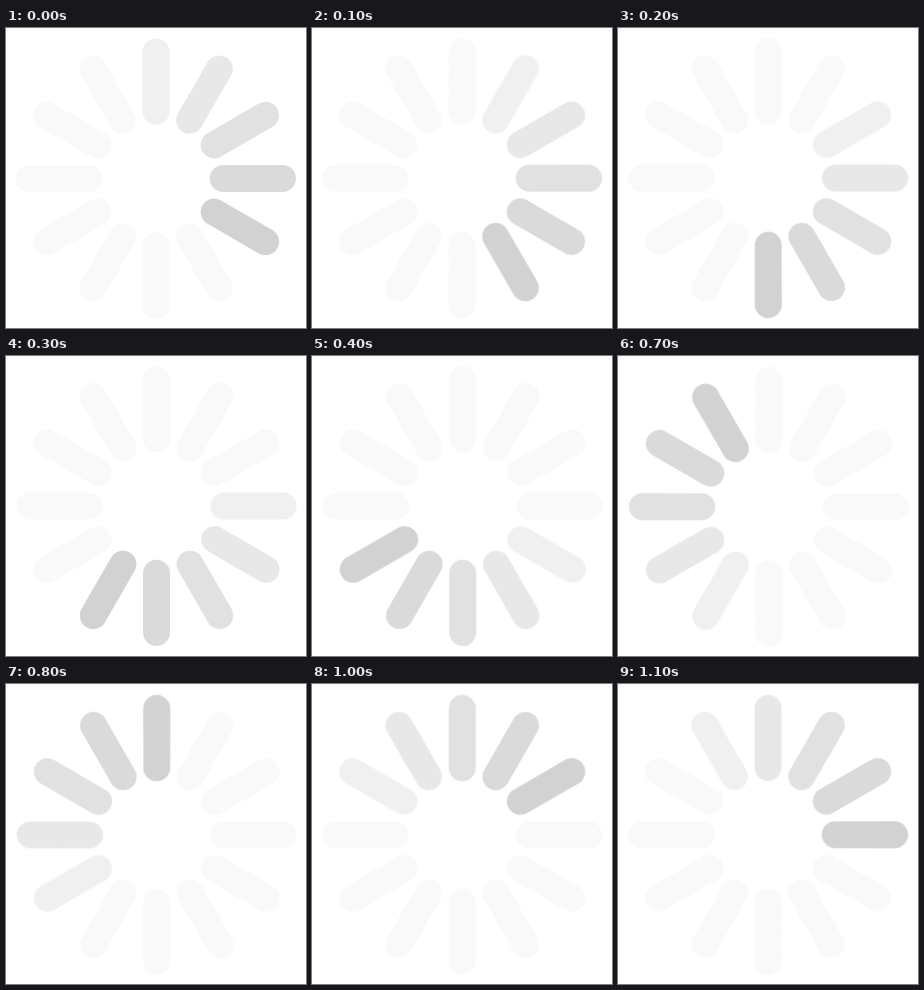
These frames come from a looping animation (300x300 px, 1200 ms). An HTML page:

```html
<!DOCTYPE html>
<html lang="en">
<head>
<meta charset="utf-8">
<title>Loading spinner</title>
<style>
  html, body { margin: 0; width: 100%; height: 100%; overflow: hidden; background: #fff; }
  svg { display: block; width: 100vw; height: 100vh; }
  /* The pivot sits half a pixel off the wheel's centre, giving a slight wobble. */
  .wheel {
    stroke: #f9f9f9;
    stroke-width: 27;
    stroke-linecap: round;
    transform-origin: 150.5px 150.5px;
    animation: spin 1200ms steps(12, end) infinite;
  }
  @keyframes spin {
    from { transform: rotate(0deg); }
    to { transform: rotate(360deg); }
  }
</style>
</head>
<body>
<svg viewBox="0 0 300 300">
  <defs>
    <line id="bar" y1="-126.5" y2="-67.2"/>
  </defs>
  <g class="wheel">
    <g transform="translate(150 150.5)">
      <use href="#bar" stroke="#f0f0f0"/>
      <use href="#bar" stroke="#e8e8e8" transform="rotate(30)"/>
      <use href="#bar" stroke="#e1e1e1" transform="rotate(60)"/>
      <use href="#bar" stroke="#dadada" transform="rotate(90)"/>
      <use href="#bar" stroke="#d2d2d2" transform="rotate(120)"/>
      <use href="#bar" transform="rotate(150)"/>
      <use href="#bar" transform="rotate(180)"/>
      <use href="#bar" transform="rotate(210)"/>
      <use href="#bar" transform="rotate(240)"/>
      <use href="#bar" transform="rotate(270)"/>
      <use href="#bar" transform="rotate(300)"/>
      <use href="#bar" transform="rotate(330)"/>
    </g>
  </g>
</svg>
</body>
</html>
```
